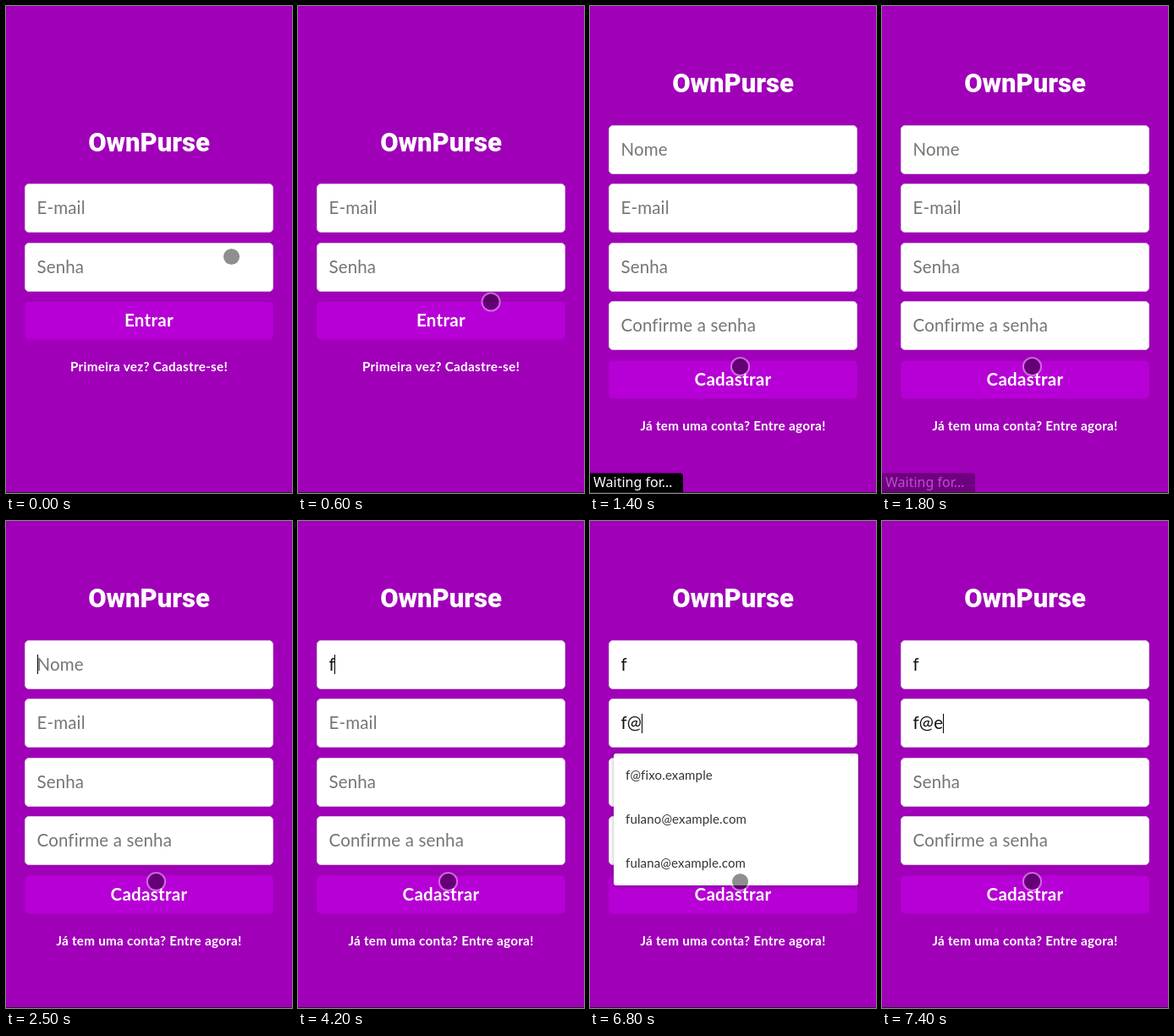
These frames come from a looping animation (338x576 px, 8000 ms). An HTML page:

```html
<!DOCTYPE html>
<html lang="pt-BR">
<head>
<meta charset="utf-8">
<title>Carteira</title>
<style>
  html, body { margin: 0; width: 100%; height: 100%; overflow: hidden; background: #a000b8; }
  svg { display: block; width: 338px; height: 576px; }
  text { font-family: Lato, sans-serif; font-size: 20.5px; letter-spacing: .15px; fill: #fff; white-space: pre; }
  .logo { font: 900 31px Roboto, sans-serif; letter-spacing: 0; }
  .action { font-weight: 700; letter-spacing: .3px; }
  .link { font-size: 15.2px; font-weight: 700; letter-spacing: .3px; }
  .hint { fill: #757575; }
  .typed { fill: #111; }
  .option { font-size: 15px; fill: #333; }
  .status { font: 16px "Noto Sans", sans-serif; letter-spacing: 0; }
  .popup { filter: drop-shadow(0 1px 2px #0005); }
</style>
</head>
<body>
<svg viewBox="0 0 338 576">
  <rect width="338" height="576" fill="#a000b8"/>
  <g id="login"></g>
  <g id="signup"></g>
  <path id="caret" d="M.5 0V23" stroke="#000"/>
  <g id="suggestions" class="popup"></g>
  <g id="status">
    <path d="M0 552.5H106Q110 552.5 110 556.5V576H0Z" fill="#000"/>
    <text class="status" x="4" y="569">Waiting for…</text>
  </g>
  <rect y="575" width="338" height="1" fill="#222420"/>
  <g id="cursor">
    <circle id="dot" r="9.6"/>
    <circle id="ring" r="10.6" fill="none" stroke-width="2"/>
  </g>
</svg>
<script>
const LOOP = 8000, PITCH = 69.6;
const $ = id => document.getElementById(id);
const centered = (cls, y, text) =>
  `<text class="${cls}" x="169" y="${y}" text-anchor="middle">${text}</text>`;

const field = (label, y) =>
  `<rect x="22.5" y="${y + .5}" width="293" height="57" rx="4.5" fill="#fff" stroke="#d9c4de"/>
   <text class="hint" x="36.5" y="${y + 36}">${label}</text>`;

function form(top, labels, action, link) {
  const buttonY = Math.round(top + labels.length * PITCH) + .5;
  return centered('logo', top - 38.5, 'OwnPurse') +
    labels.map((label, i) => field(label, Math.round(top + i * PITCH))).join('') +
    `<rect x="22.3" y="${buttonY}" width="293.5" height="45" rx="5" fill="#b700d5"/>` +
    centered('action', buttonY + 29.2, action) +
    centered('link', buttonY + 82.6, link);
}

$('login').innerHTML = form(210.2, ['E-mail', 'Senha'], 'Entrar', 'Primeira vez? Cadastre-se!');
$('signup').innerHTML = form(140.6, ['Nome', 'E-mail', 'Senha', 'Confirme a senha'],
  'Cadastrar', 'Já tem uma conta? Entre agora!');

// Last entry of a [time, value] list that has started.
const at = (steps, t) => steps.filter(([start]) => start <= t).pop()[1];

const cursorPath = [
  [0, [266.5, 296.5]], [400, [261.5, 313.5]], [600, [228, 350]],
  [700, [192, 390]], [900, [186, 407]], [1000, [177.5, 426.5]]
];
const nameTyped = [[0, ''], [4200, 'f']];
const mailTyped = [[0, ''], [6100, 'f'], [6800, 'f@'], [7400, 'f@e']];
const options = [
  [0, []],
  [6300, ['f@fixo.example', 'fulano@example.com', 'fulana@example.com']],
  [6900, ['f@fixo.example']],
  [7400, []]
];
const statusOpacity = [[0, 0], [1400, 1], [1700, .65], [1800, .3], [1900, 0]];

const [nameText, mailText] = $('signup').querySelectorAll('.hint');

function fill(node, value, hint) {
  node.textContent = value || hint;
  node.setAttribute('class', value ? 'typed' : 'hint');
}

function showOptions(list) {
  $('suggestions').innerHTML = list.length
    ? `<rect x="28" y="275" width="289" height="${list.length * 52}" rx="3" fill="#fff"/>` +
      list.map((text, i) => `<text class="option" x="42" y="${306 + i * 52}">${text}</text>`).join('')
    : '';
}

function draw(t) {
  const signup = t >= 1400, pressed = t >= 1100 && !signup;
  $('login').style.display = signup ? 'none' : '';
  $('signup').style.display = signup ? '' : 'none';
  $('status').style.opacity = at(statusOpacity, t);

  const name = at(nameTyped, t), mail = at(mailTyped, t);
  fill(nameText, name, 'Nome');
  fill(mailText, mail, 'E-mail');

  const inMail = t >= 4800;
  const active = inMail ? mailText : nameText;
  const width = (inMail ? mail : name) ? active.getComputedTextLength() - 1 : 0;
  $('caret').style.display = t >= 2500 ? '' : 'none';
  $('caret').setAttribute('transform', `translate(${37 + Math.round(width)} ${inMail ? 228 : 158})`);
  showOptions(at(options, t));

  $('cursor').setAttribute('transform', `translate(${at(cursorPath, t)})`);
  $('dot').setAttribute('fill', pressed ? 'rgba(25,20,25,.65)' : 'rgba(0,0,0,.44)');
  $('ring').setAttribute('stroke', pressed ? 'rgba(190,170,190,.6)' : 'rgba(255,255,255,.4)');
}

const start = performance.now();
function tick() {
  draw((performance.now() - start) % LOOP);
  requestAnimationFrame(tick);
}
tick();
</script>
</body>
</html>
```
